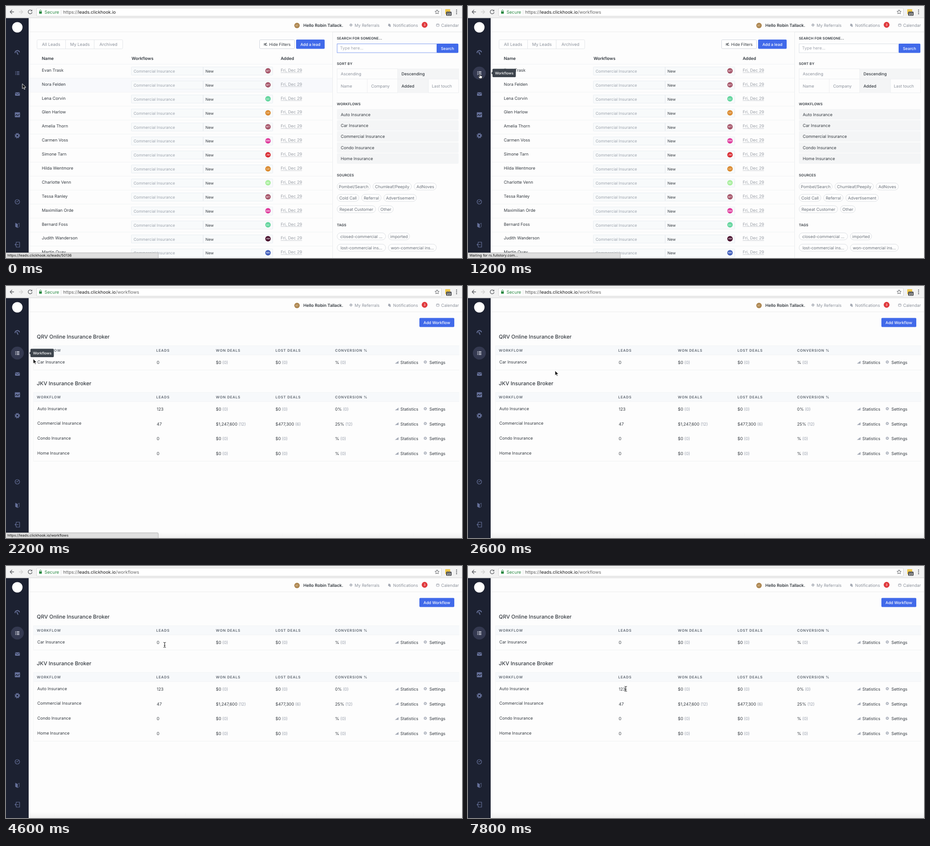
Recreate the animation shown at these times as an HTML page. Size 1006 by 556 pixels, loop 8000 ms.

```html
<!DOCTYPE html>
<html lang="en">
<head>
<meta charset="utf-8">
<title>Leads</title>
<style>
html, body { margin: 0; width: 100%; height: 100%; overflow: hidden; background: #fdfdfd; }
svg { display: block; width: 100%; height: 100%; font-family: Inter, Roboto, sans-serif; }
text { white-space: pre; text-rendering: geometricPrecision; }
</style>
</head>
<body>
<svg id="stage" viewBox="0 0 1006 556"></svg>
<script>
const INK = '#343a40', GREY = '#8b919b', BLUE = '#416aea', NAVY = '#1c2131', ICON = '#66719a';
const LINE = '#eceef0', PALE = '#f4f5f6';

// y is the vertical middle of the capitals
const text = (x, y, str, { s = 9.2, c = INK, w = 400, ls = 0, a = 'start', more = '' } = {}) =>
  `<text x="${x}" y="${y + s * 0.364}" font-size="${s}" fill="${c}" font-weight="${w}" letter-spacing="${ls}" text-anchor="${a}" ${more}>${str}</text>`;
const box = (x, y, w, h, fill, stroke = 'none', r = 0) =>
  `<rect x="${x}" y="${y}" width="${w}" height="${h}" rx="${r}" fill="${fill}" stroke="${stroke}"/>`;
const disc = (x, y, r, fill) => `<circle cx="${x}" cy="${y}" r="${r}" fill="${fill}"/>`;
const path = (d, stroke, w = 1, fill = 'none') =>
  `<path d="${d}" fill="${fill}" stroke="${stroke}" stroke-width="${w}" stroke-linecap="round" stroke-linejoin="round"/>`;
const line = (x1, y1, x2, y2, c = LINE) => `<path d="M${x1} ${y1}L${x2} ${y2}" stroke="${c}"/>`;
const at = (x, y, body, id = '') => `<g ${id && `id="${id}"`} transform="translate(${x} ${y})">${body}</g>`;
const group = (id, body) => `<g id="${id}">${body}</g>`;
const gear = (x, y, r, c, hole) =>
  `<circle cx="${x}" cy="${y}" r="${r}" fill="none" stroke="${c}" stroke-width="${r * 0.45}" stroke-dasharray="${r * 0.393}"/>` +
  disc(x, y, r * 0.9, c) + disc(x, y, r * 0.4, hole);
const bars = (x, y) => path(`M${x} ${y + 3}l8-6v6z`, 'none', 0, '#a5abb7');

function browserBar() {
  return box(0, 0, 1006, 26, '#f2f2f2') + line(0, 26, 1006, 26, '#d2d2d2') +
    path('M17 13H9m4-4-4 4 4 4', '#5c5f63', 1.3) +
    path('M29 13h8m-4-4 4 4-4 4', '#d0d0d0', 1.3) +
    path('M56.6 10.2a4.3 4.3 0 1 0 .8 4', '#5c5f63', 1.3) + path('M57.8 8v3.6h-3.6z', 'none', 0, '#5c5f63') +
    box(67.5, 4.5, 893, 18, '#fff', '#d5d5d5', 2) +
    box(73, 12, 6, 5, '#2a8a43', 'none', .7) + path('M74.2 12v-1.6a1.8 1.8 0 0 1 3.6 0V12', '#2a8a43', 1) +
    text(85, 13.5, 'Secure', { s: 9.7, c: '#2a8a43' }) + line(121.5, 8, 121.5, 19, '#dedede') +
    text(126, 13.5, '<tspan fill="#555">https://</tspan>leads.clickhook.io<tspan id="route" fill="#666">/workflows</tspan>', { s: 9.8, c: '#1b1b1b' }) +
    path('M951 8.5l1.4 3 3.2.4-2.4 2.2.6 3.2-2.8-1.6-2.8 1.6.6-3.2-2.4-2.2 3.2-.4z', '#5c5f63', 1) +
    box(969, 7, 11, 11, '#efc84a', 'none', 1) + box(971, 12.5, 12, 9, '#4b4d50', 'none', 1.5) +
    text(977, 17.2, '23', { s: 6.8, c: '#fff', w: 600, a: 'middle' }) +
    [9, 13, 17].map(y => disc(994, y, 1.2, '#5c5f63')).join('');
}

function sidebar() {
  return box(0, 26.5, 50, 530, NAVY) + disc(25, 47, 11.5, '#fff') +
    at(25, 102, path('M-5 1a5 5 0 0 1 9.6-1.6', ICON, 2) + path('M-1 0 1.3 4.6', ICON, 2)) +
    `<circle id="active" cx="25" cy="148" r="14.3" fill="#343950"/>` +
    group('list', [-3.2, 0, 3.2].map(d => disc(21.3, 148 + d, .9, 'currentColor') + box(23.5, 147.3 + d, 6, 1.5, 'currentColor')).join('')) +
    box(20, 190.5, 10.5, 7.5, ICON, 'none', 1) + path('M20 191.5l5.2 3.4 5.2-3.4', NAVY, 1) +
    box(19.5, 234.5, 11.5, 11, ICON, 'none', 1) + path('M21 241.5l2.6-2.3 2.4 2.6 3.5-3.3', NAVY, 1.2) +
    gear(25, 286, 4.9, ICON, NAVY) +
    `<circle cx="25" cy="432" r="5" fill="none" stroke="${ICON}" stroke-width="1.2"/>` + path('M22.3 432h2.9l2-2.6', ICON, 1.1) +
    path('M21 479l4 2v8l-4-2z', ICON, .6, ICON) + path('M26 481l3.3-2v8l-3.3 2z', ICON, .8) +
    path('M22.5 523.5v-2.5h7.5v11h-7.5v-2.5M27 526.5h-7m2.2-2.3-2.3 2.3 2.3 2.3', ICON, 1.2);
}

function header() {
  const c = GREY;
  return line(50, 57, 1006, 57, '#ebebeb') +
    disc(642, 43, 6, '#ad8650') + text(642, 43, 'RT', { s: 5, c: '#f3e6cf', a: 'middle' }) +
    text(656, 42.5, 'Hello Robin Tallack.', { s: 9.3, w: 600 }) +
    gear(761, 42, 2.7, '#a4a9b3', '#fff') + text(769, 42.5, 'My Referrals', { c }) +
    path('M844.5 39.5l3 .8.8 4.5-4.6-1.2zM846 45.2l2 .4', '#a4a9b3', 1, '#a4a9b3') + text(854, 42.5, 'Notifications', { c }) +
    disc(923.5, 41.5, 6.4, '#e0393c') + text(923.5, 41.6, '3', { s: 7, c: '#fff', a: 'middle' }) +
    box(949.5, 39.5, 6, 5.5, 'none', '#a4a9b3', 1) + line(949.5, 41, 955.5, 41, '#a4a9b3') + text(960, 42.5, 'Calendar', { c });
}

const tones = { MT: '#a6566a', DC: '#62d59d', LU: '#db8b31', MW: '#df3c9d', JW: '#d92e35', BD: '#a8ee9d', AM: '#49102e', WA: '#425fbb' };
const leads = [
  ['Evan Trask', 'MT'], ['Nora Felden', 'MT'], ['Lena Corvin', 'DC'], ['Glen Harlow', 'LU'], ['Amelia Thorn', 'MT'],
  ['Carmen Voss', 'MW'], ['Simone Tarn', 'JW'], ['Hilda Wentmore', 'LU'], ['Charlotte Venn', 'BD'], ['Tessa Ranley', 'MT'],
  ['Maximilian Orde', 'MW'], ['Bernard Foss', 'DC'], ['Judith Wanderson', 'AM'], ['Martin Quay', 'WA']
];

function leadRow([name, owner], i) {
  const y = 141.5 + i * 30.88, mid = y + 2;
  return line(50, y - 13.2, 720, y - 13.2, '#f1f3f4') + text(79, y, name) +
    box(276.5, mid - 9, 312, 18, '#f8fafb', '#e9eef2', 1) + line(435, mid - 9, 435, mid + 9, '#dfe4ea') +
    text(281.5, mid + .4, 'Commercial Insurance', { s: 8.65, c: '#9aa1ab' }) + text(440, mid + .4, 'New', { s: 8.5 }) +
    disc(578, mid - .5, 6, tones[owner]) + text(578, mid - .5, owner, { s: 5, c: '#fff', w: 500, a: 'middle' }) +
    text(606, y, 'Fri, Dec 29', { c: '#9a9fa7' }) + line(606, y + 5.5, 653, y + 5.5, '#c9ccd1');
}

const pills = [
  [398, [730, 74, 'Pombel/Search'], [809, 86, 'Chumleaf/Peepily'], [900, 50, 'AdNoves']],
  [423, [730, 49, 'Cold Call'], [784, 44, 'Referral'], [833, 73, 'Advertisement']],
  [448, [730, 86, 'Repeat Customer'], [821, 34, 'Other']],
  [508, [730, 108, 'closed-commercial ...'], [843, 48, 'imported']],
  [533, [730, 108, 'lost-commercial ins...'], [843, 107, 'won-commercial ins...']]
];

function filters() {
  const title = (y, str) => text(730, y, str, { s: 7.6, w: 600, ls: .18 });
  const pale = { s: 9, c: GREY }, strong = { s: 9, w: 500 };
  return box(720.5, 57.5, 290, 500, '#fdfdfd', '#e9ebed') + title(71, 'SEARCH FOR SOMEONE...') +
    `<rect id="field" x="730.5" y="83.5" width="220" height="19.5" fill="#fff"/>` +
    text(737, 93, 'Type here...', { c: '#a0a5ae' }) +
    box(950, 83, 48, 20.5, BLUE, 'none', 2) + text(974, 93.5, 'Search', { s: 8.7, c: '#fff', w: 500, a: 'middle' }) +
    title(127, 'SORT BY') + box(730.5, 138.5, 268, 53, '#fdfdfd', LINE) +
    box(864, 138, 134.5, 23, PALE) + box(864, 161, 68, 31, PALE) +
    line(730, 161, 998, 161) + line(797, 161, 797, 192) + line(864, 138, 864, 192) + line(932, 161, 932, 192) +
    text(738.5, 150, 'Ascending', pale) + text(872.5, 150, 'Descending', strong) +
    text(738.5, 177, 'Name', pale) + text(805.5, 177, 'Company', pale) + text(872.5, 177, 'Added', strong) + text(939.5, 177, 'Last touch', pale) +
    title(216, 'WORKFLOWS') +
    ['Auto', 'Car', 'Commercial', 'Condo', 'Home'].map((kind, i) =>
      box(730, 227.5 + i * 24.4, 268.5, 23, PALE, 'none', 2) + text(738.5, 239.2 + i * 24.4, kind + ' Insurance')).join('') +
    title(373, 'SOURCES') + title(483, 'TAGS') +
    pills.map(([y, ...row]) => row.map(([x, w, str]) =>
      box(x + .5, y - 7.5, w - 1, 15.5, '#fefefe', '#dcdfe3', 7.7) +
      text(x + w / 2, y + .3, str, { s: 9.1, c: '#697079', a: 'middle' })).join('')).join('');
}

function leadsPage() {
  const tab = { s: 9.4, c: GREY, a: 'middle' }, head = { s: 9.3, w: 600 };
  return `<rect id="rowHover" x="50" y="159" width="670" height="31" fill="#f8f9fc"/>` +
    box(68.5, 74.5, 189, 20, '#fefefe', '#e3e6e9', 2) + line(131.5, 74, 131.5, 94, '#e3e6e9') + line(194.5, 74, 194.5, 94, '#e3e6e9') +
    text(99.5, 84.8, 'All Leads', tab) + text(163, 84.8, 'My Leads', tab) + text(226, 84.8, 'Archived', tab) +
    box(559.5, 74.5, 77, 19.5, '#fff', '#cfd4dc', 2) + path('M569 86.5c1-3 5-3 6-4M569 83.5h3m1 3h3m-2-5-2.5 6', INK, 1) +
    text(580.5, 84.8, 'Hide Filters', { s: 8.9 }) +
    box(640, 74, 63, 20.5, BLUE, 'none', 2) + text(671.5, 84.8, 'Add a lead', { s: 8.7, c: '#fff', w: 500, a: 'middle' }) +
    text(79, 115.5, 'Name', head) + text(277, 115.5, 'Workflows', head) + text(606, 115.5, 'Added', head) +
    leads.map(leadRow).join('') + filters();
}

const columns = [68, 331.5, 463, 594.5, 726];
function brokerTable(top, name, rows) {
  const last = top + 53.3 + (rows.length - 1) * 32.75;
  return text(68, top - 20.5, name, { s: 11.6, w: 500 }) +
    box(60, top, 940, 20, '#f7f9fb') + line(60, top, 1000, top, '#f1f3f5') + line(60, top + 20, 1000, top + 20, '#f1f3f5') +
    ['WORKFLOW', 'LEADS', 'WON DEALS', 'LOST DEALS', 'CONVERSION %'].map((h, i) =>
      text(columns[i], top + 10.3, h, { s: 7.8, c: '#5b636d', w: 600, ls: .8 })).join('') +
    rows.map((row, r) => {
      const y = top + 36.7 + r * 32.65;
      return row.map((cell, i) => {
        const [value, count] = cell.split(' (');
        const body = i && count ? `${value}<tspan fill="#949ba8"> (${count}</tspan>` : cell;
        return text(columns[i] + (i < 2 ? 1 : 0), i ? y : y - 1.2, body);
      }).join('') +
        bars(858, y - .5) + text(870, y, 'Statistics') + gear(925, y - 1, 3, '#a5abb7', '#fff') + text(934, y, 'Settings');
    }).join('') +
    line(60, last, 1000, last, '#f0f2f3') + line(60.5, top, 60.5, last, '#f5f6f7');
}

function workflowsPage() {
  const none = ['0', '$0 (0)', '$0 (0)', '% (0)'];
  return box(912, 70.5, 77, 20, BLUE, 'none', 2) + text(950.5, 81, 'Add Workflow', { s: 8.7, c: '#fff', w: 500, a: 'middle' }) +
    brokerTable(132, 'QRV Online Insurance Broker', [['Car Insurance', ...none]]) +
    brokerTable(235, 'JKV Insurance Broker', [
      ['Auto Insurance', '123', '$0 (0)', '$0 (0)', '0% (0)'],
      ['Commercial Insurance', '47', '$1,247,600 (12)', '$477,300 (6)', '25% (12)'],
      ['Condo Insurance', ...none],
      ['Home Insurance', ...none]
    ]) + box(50, 543, 956, 13, 'url(#foot)');
}

const cursors = {
  arrow: path('M0 0V10.4L2.5 8.1 4.2 12 6 11.2 4.3 7.5H7.6Z', '#fff', .9, '#111'),
  hand: path('M-.9 .8C-.9-.3 .9-.3 .9 .8V4.2L4.6 5C5.4 5.2 5.5 6 5.3 7L4.6 10.5H-.6L-3.6 6.4C-3.4 5.2-2 5.6-.9 6.8Z', '#111', .9, '#fff'),
  beam: path('M-2.2-5.5Q0-5.5 0-4.3Q0-5.5 2.2-5.5M0-4.3V4.3M-2.2 5.5Q0 5.5 0 4.3Q0 5.5 2.2 5.5M-1.2 1.2H1.2', '#111', 1)
};

const stage = document.getElementById('stage');
stage.innerHTML =
  '<defs><linearGradient id="foot" x2="0" y2="1"><stop stop-color="#fdfdfd"/><stop offset="1" stop-color="#f0f0f0"/></linearGradient></defs>' +
  box(0, 0, 1006, 556, '#fdfdfd') + group('leads', leadsPage()) + group('workflows', workflowsPage()) +
  header() + sidebar() + browserBar() +
  group('tip', path('M54 145l-3 3 3 3z', 'none', 0, '#3d444c') + box(54, 138.5, 51.5, 18.5, '#3d444c', 'none', 2) +
    text(79.8, 148.2, 'Workflows', { s: 8, c: '#fff', w: 500, a: 'middle' })) +
  group('status', path('M-1 557V544.5H334Q336 544.5 336 546.5V557', '#b4b4b4', 1, '#dfdfdf') +
    text(3, 550.5, '', { s: 7.9, c: '#111', more: 'id="message"' })) +
  Object.entries(cursors).map(([kind, art]) => at(0, 0, art, kind)).join('');

const $ = id => document.getElementById(id);
const show = (id, on) => $(id).style.display = on ? '' : 'none';

// [ms, x, y, cursor]
const track = [
  [0, 36, 172, 'arrow'], [200, 34, 166, 'arrow'], [400, 29, 155, 'hand'], [600, 26, 149.5, 'hand'], [2000, 26, 149.5, 'hand'],
  [2200, 60, 161, 'arrow'], [2600, 192, 187, 'arrow'], [3000, 245, 190, 'arrow'], [3400, 268, 186, 'arrow'],
  [3800, 298, 176, 'arrow'], [4200, 338, 170, 'beam'], [4600, 350, 174, 'beam'], [4800, 349, 192, 'arrow'],
  [5200, 348, 248, 'arrow'], [5400, 348, 266, 'beam'], [5600, 348, 271, 'beam'], [8000, 348, 271, 'beam']
];
const host = 'https://leads.clickhook.io';
const messages = [[0, host + '/leads/50136'], [200, ''], [400, host + '/workflows'], [1000, 'Waiting for rs.fullstory.com...'], [1400, host + '/workflows'], [2400, '']];

function draw(ms) {
  const t = Math.floor(ms / 200) * 200;
  const i = track.findLastIndex(k => k[0] <= t);
  const [t0, x0, y0, kind] = track[i], [t1, x1, y1] = track[i + 1];
  const p = (t - t0) / (t1 - t0);
  for (const name in cursors) show(name, name === kind);
  $(kind).setAttribute('transform', `translate(${x0 + (x1 - x0) * p} ${y0 + (y1 - y0) * p})`);

  const message = messages.findLast(m => m[0] <= t)[1];
  show('status', message);
  $('message').textContent = message;

  show('leads', t < 1400);
  show('workflows', t >= 1400);
  show('route', t >= 1000);
  show('rowHover', t < 200);
  show('active', t >= 400);
  $('list').style.color = t >= 400 ? '#e8eaf2' : ICON;
  show('tip', t >= 400 && t < 2400);
  $('field').setAttribute('stroke', t < 1000 ? '#7f9cf0' : '#dadee4');
}

const start = performance.now();
function tick() {
  draw((performance.now() - start) % 8000);
  requestAnimationFrame(tick);
}
tick();
</script>
</body>
</html>
```
